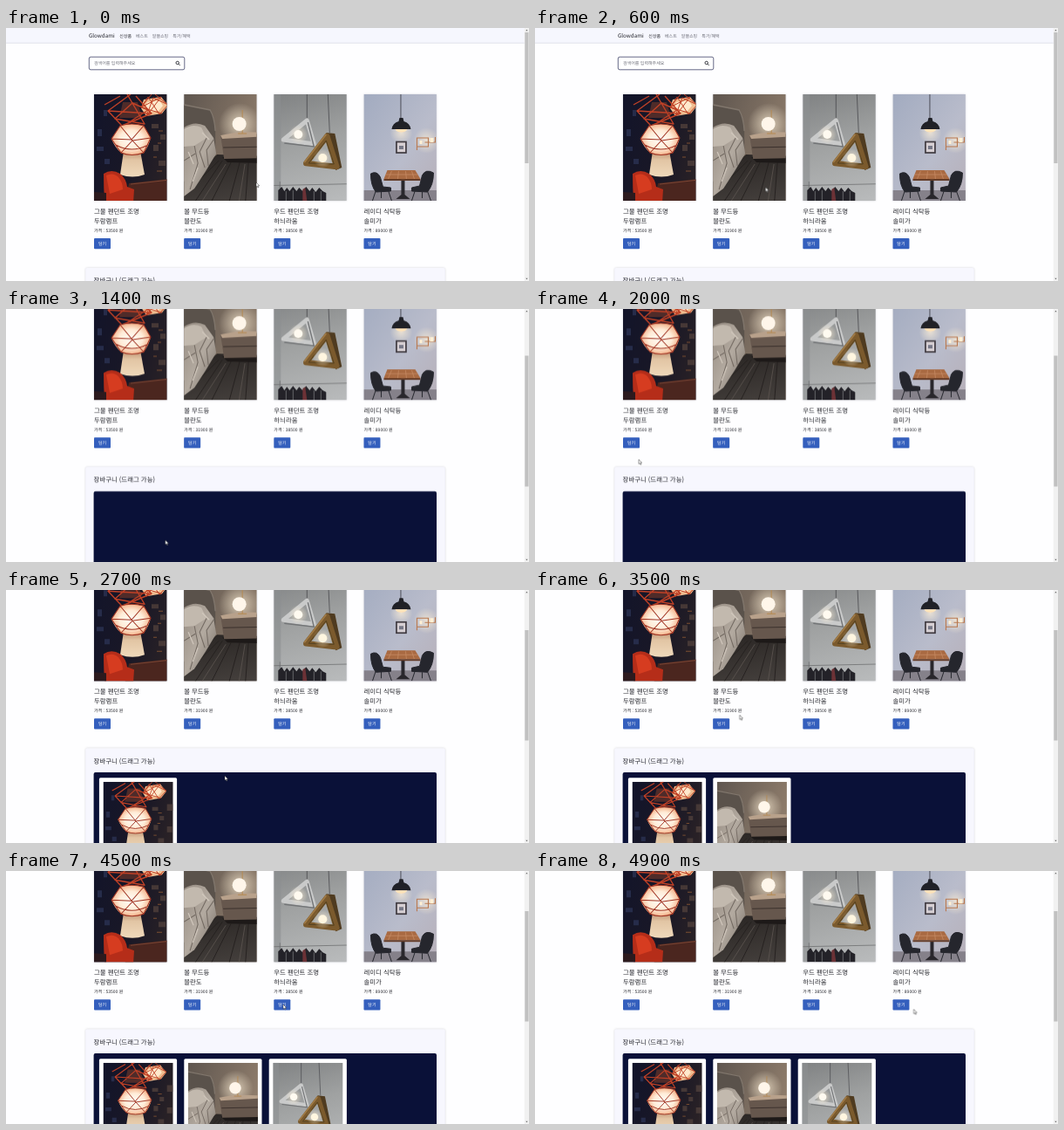
Write an HTML page that moves like this. It is 600x290 px and loops after 5 s.

```html
<!DOCTYPE html>
<html lang="ko">
<head>
<meta charset="utf-8">
<title>조명 쇼핑몰</title>
<style>
html, body { margin: 0; width: 100%; height: 100%; overflow: hidden; background: #fefeff; }
#stage { display: block; width: 600px; height: 290px; }
text { font-family: "Noto Sans CJK KR", "Noto Sans CJK", "Noto Sans KR", sans-serif; fill: #24252b; text-rendering: geometricPrecision; }
.h { font-size: 7.4px; }
.s { font-size: 5px; }
.logo { font-size: 6.25px; font-weight: 500; }
.dim { fill: #6d6e78; }
.btn { fill: #fff; text-anchor: middle; font-weight: 500; }
.soft { filter: drop-shadow(0 .4px .9px rgba(30, 30, 60, .2)); }

#page, #thumb, #cursor, .item { animation: 5s infinite step-end; }
#page { animation-name: scroll; }
#thumb { animation-name: thumb; }
#cursor { animation-name: cursor; }
#item0 { animation-name: add0; }
#item1 { animation-name: add1; }
#item2 { animation-name: add2; }

/* three turns of the wheel */
@keyframes scroll {
  0%, 14% { transform: translateY(0); }
  16% { transform: translateY(-14px); }
  18% { transform: translateY(-31.25px); }
  20% { transform: translateY(-50px); }
  22% { transform: translateY(-62.5px); }
  26% { transform: translateY(-80px); }
  28%, 100% { transform: translateY(-93.75px); }
}
@keyframes thumb {
  0%, 14% { y: 5px; height: 150px; }
  16% { y: 12px; height: 150px; }
  18% { y: 21px; height: 150px; }
  20% { y: 31px; height: 150px; }
  22% { y: 37.4px; height: 150px; }
  26% { y: 46.5px; height: 150px; }
  28% { y: 53.5px; height: 150px; }
  44%, 100% { y: 46px; height: 126.5px; }
}
@keyframes add0 { 0% { visibility: hidden; } 44%, 100% { visibility: visible; } }
@keyframes add1 { 0% { visibility: hidden; } 66%, 100% { visibility: visible; } }
@keyframes add2 { 0% { visibility: hidden; } 90%, 100% { visibility: visible; } }
/* the pointer moves ten times a second */
@keyframes cursor {
  0% { transform: translate(287px, 177px); animation-timing-function: steps(6); }
  12% { transform: translate(264.5px, 182.5px); animation-timing-function: steps(5); }
  22% { transform: translate(185px, 228.5px); animation-timing-function: steps(4); }
  30% { transform: translate(182px, 277px); animation-timing-function: steps(5); }
  40% { transform: translate(119px, 172.5px); animation-timing-function: steps(2); }
  44% { transform: translate(112px, 154px); }
  46% { transform: translate(112px, 154px); animation-timing-function: steps(4); }
  54% { transform: translate(251px, 213px); animation-timing-function: steps(5); }
  64% { transform: translate(214px, 154px); }
  68% { transform: translate(214px, 154px); animation-timing-function: steps(7); }
  82% { transform: translate(359.5px, 79px); animation-timing-function: steps(3); }
  88% { transform: translate(318px, 153px); }
  90% { transform: translate(318px, 153px); animation-timing-function: steps(4); }
  98%, 100% { transform: translate(434.5px, 158.5px); }
}
</style>
</head>
<body>
<svg id="stage" viewBox="0 0 600 290">
  <defs>
    <linearGradient id="night" x2="1" y2=".4">
      <stop offset="0" stop-color="#12142a"/><stop offset=".6" stop-color="#1a1826"/><stop offset="1" stop-color="#2a2226"/>
    </linearGradient>
    <radialGradient id="glow">
      <stop offset="0" stop-color="#fffdf8"/><stop offset=".6" stop-color="#ffecd8"/><stop offset="1" stop-color="#f3b48c"/>
    </radialGradient>
    <radialGradient id="halo">
      <stop offset="0" stop-color="#fff1d8" stop-opacity=".7"/><stop offset="1" stop-color="#fff1d8" stop-opacity="0"/>
    </radialGradient>
    <linearGradient id="shade" x2="0" y2="1">
      <stop offset="0" stop-color="#b98c6c"/><stop offset=".35" stop-color="#e2c5a4"/><stop offset="1" stop-color="#efd9bb"/>
    </linearGradient>
    <linearGradient id="room" x2="1" y2=".5">
      <stop offset="0" stop-color="#5f564f"/><stop offset="1" stop-color="#94816f"/>
    </linearGradient>
    <linearGradient id="floor" x2=".3" y2="1">
      <stop offset="0" stop-color="#282422"/><stop offset="1" stop-color="#484340"/>
    </linearGradient>
    <linearGradient id="linen" x2="1" y2="1">
      <stop offset="0" stop-color="#968c82"/><stop offset=".5" stop-color="#b3aaa0"/><stop offset="1" stop-color="#726a63"/>
    </linearGradient>
    <linearGradient id="plaster" x2=".2" y2="1">
      <stop offset="0" stop-color="#808283"/><stop offset=".45" stop-color="#9fa1a1"/><stop offset="1" stop-color="#b9bbbc"/>
    </linearGradient>
    <linearGradient id="wall" x2="1" y2="1">
      <stop offset="0" stop-color="#a2abc0"/><stop offset=".5" stop-color="#b9bccb"/><stop offset="1" stop-color="#b6abb2"/>
    </linearGradient>

    <g id="photo0">
      <rect width="96" height="140" fill="url(#night)"/>
      <path d="M66 34h8v5h-8zM76 46h6v6h-6zM68 58h6v7h-6zM74 76h8v6h-8zM86 30h8v9h-8zM86 60h7v8h-7z" fill="#463836"/>
      <path d="M4 40h5v8H4zM3 60h8v5H3zM11 18h4v7h-4zM12 74h6v6h-6z" fill="#262c4a"/>
      <path d="M74 42h5M73 56h4M68 72h4M72 88h6" stroke="#7c4f31" stroke-width="1.1"/>
      <path d="M57 6l20-3 8 10-7 9-18 3-6-9z" fill="#f0bd90"/>
      <path d="M61 9l14-2 4 6-5 6-11 1-4-5z" fill="#ffe9cc"/>
      <path d="M33 9h17l5 18H29z" fill="#4f2b29"/>
      <g fill="none" stroke="#bf4026" stroke-linejoin="round">
        <path d="M42 0L16 19 32 36 66 22 48 2M38 0L58 34 24 28 44 10 62 18 34 36M30 2L12 12M16 19L66 22" stroke-width="1.4"/>
        <path d="M54 15L62 3 75 23 85 12 68 4 60 25 77 3 54 15 78 22M66 0L54 15M70 0L85 12" stroke-width="1"/>
      </g>
      <path d="M34 65h19l5 27q-14 5-28 0z" fill="url(#shade)"/>
      <path d="M30 36q13-4 27 0l8 14q-2 9-8 17-13 5-26 0-7-6-11-16z" fill="url(#glow)"/>
      <path d="M20 51L30 36 44 53 65 50 57 36 43 52 20 51 31 67 44 53 57 67 65 50M31 67Q43 72 57 67M30 36Q43 32 57 36M25 58Q43 68 62 58" fill="none" stroke="#a13524" stroke-width="1.1" stroke-linejoin="round"/>
      <path d="M40 102l56-6v44H32z" fill="#4b261f"/>
      <path d="M42 103l54-6" stroke="#7a4534" stroke-width="1"/>
      <path d="M11 91q9-6 19 0 7 6 8 15l8 3-2 31H14q-3-20-3-49z" fill="#b52d19"/>
      <path d="M14 93q8-4 14 2 5 6 5 14l-15 5z" fill="#d63c20"/>
      <path d="M0 112l14 1v27H0z" fill="#2c1a1e"/>
    </g>

    <g id="photo1">
      <rect width="96" height="140" fill="url(#room)"/>
      <path d="M0 100l38-31 58 2v69H0z" fill="url(#floor)"/>
      <path d="M8 130L44 76M28 130L54 78M50 130L64 78M70 130L74 78M90 130L84 78M4 112L40 76" stroke="#24201f" stroke-width=".9"/>
      <path d="M16 130L48 80M62 130L70 80" stroke="#5d5651" stroke-width=".8"/>
      <path d="M0 12l30 6q5 8 6 24v20H0z" fill="#5a524b"/>
      <path d="M0 12l30 6q5 8 6 24" fill="none" stroke="#80766c" stroke-width="1.4"/>
      <path d="M0 38q12-8 24-2l10 14 3 18-12 20-13 20-12 9z" fill="url(#linen)"/>
      <path d="M0 40q10-7 20-2l6 12-14 9-12 1z" fill="#c2b9ae"/>
      <path d="M26 50l-8 16 6 18M12 59l4 20-9 30M34 52l-8 12 2 18M0 76l13-8" fill="none" stroke="#756c64" stroke-width="1.1"/>
      <path d="M5 66l6 14M21 44l8 8M16 84l-6 16" stroke="#d0c7bc" stroke-width="1.2"/>
      <circle cx="64" cy="34" r="24" fill="url(#halo)"/>
      <path d="M44 72l52 1v6l-46-1z" fill="#1d1918"/>
      <path d="M42 47l54-2v28l-50 1z" fill="#66574d"/>
      <path d="M42 47l22-4 32 1v4L44 51z" fill="#b8a18b"/>
      <path d="M45 61l51-1" stroke="#3a302c" stroke-width="1.1"/>
      <path d="M67 18v27M62 45h10" stroke="#b48a52" stroke-width="1"/>
      <circle cx="63.5" cy="34" r="8" fill="#fff6ea"/>
    </g>

    <g id="photo2">
      <rect width="96" height="140" fill="url(#plaster)"/>
      <path d="M0 0h8v140H0z" fill="#8d8f91" opacity=".6"/>
      <path d="M38 0v29M62 0l2 44" stroke="#3e3e42" stroke-width=".7"/>
      <path d="M11 52L38 30l8 27z" fill="none" stroke="#c9caca" stroke-width="5" stroke-linejoin="round"/>
      <path d="M12 56L46 60 39 32" fill="none" stroke="#737577" stroke-width="1.4"/>
      <circle cx="28" cy="46" r="11" fill="url(#halo)"/>
      <circle cx="28" cy="46" r="5" fill="#fffaf0"/>
      <path d="M60 44l10 1 8 39-7 3z" fill="#4f3b20"/>
      <path d="M37 79L61 48l11 35z" fill="none" stroke="#7b5a2d" stroke-width="6.5" stroke-linejoin="round"/>
      <path d="M35 78L60 46" stroke="#a27c47" stroke-width="1.6"/>
      <path d="M40 79L60 53l9 27z" fill="none" stroke="#53401f" stroke-width="1"/>
      <circle cx="56" cy="73" r="11" fill="url(#halo)"/>
      <circle cx="56" cy="73" r="5" fill="#fff6e0"/>
      <path d="M0 104.5l96-2M7 100v8" stroke="#6f7072" stroke-width=".8"/>
      <path d="M5 122V110l4-4 3 5 3-4 3 4 4-5 4 5 3-4 4 4 4-5 4 5 3-4 4 5 4-5 4 4 4 2v10z" fill="#232228"/>
      <path d="M33 109l3-2 2 15h-5z" fill="#6c3236"/>
      <path d="M14 111v11M22 110v12M46 111v11M54 111v11" stroke="#77787c" stroke-width=".8"/>
    </g>

    <g id="photo3">
      <rect width="96" height="140" fill="url(#wall)"/>
      <path d="M0 110h96v30H0z" fill="#85818a"/>
      <path d="M42.5 0v28" stroke="#33333b" stroke-width=".8"/>
      <circle cx="43" cy="44" r="13" fill="url(#halo)"/>
      <path d="M41 27h4l1 4q7 2 8 9H32q1-7 8-9z" fill="#202127"/>
      <path d="M36 40h14q-2 3.5-7 3.5T36 40z" fill="#ffe2b8"/>
      <rect x="37.5" y="54.5" width="11" height="12.5" fill="#d6cfd3" stroke="#3f3a40" stroke-width="1.7"/>
      <path d="M40.5 63v-4h5v4z" fill="#767887"/>
      <circle cx="72" cy="53" r="15" fill="url(#halo)"/>
      <path d="M61 50h13v10H61zM70 55h12v-6M61 60v4" fill="none" stroke="#b9784f" stroke-width="1.1"/>
      <path d="M64 53h3v4h-3zM76 50h4v5h-4z" fill="#fff0d4"/>
      <path d="M43 98h4v17l6 5H37l6-5z" fill="#29272c"/>
      <path d="M27 87h32l6 10H23z" fill="#a96a42"/>
      <path d="M25 92h37M32 88l-4 9M40 88l-1 9M48 88l1 9M55 88l3 9" stroke="#c98f67" stroke-width=".7"/>
      <path d="M23 97h42v2H23z" fill="#643c28"/>
      <g fill="#25262d" stroke="#25262d">
        <path d="M8 91q7-4 11 4l3 11 9 1v4l-17 1q-6-7-6-21z"/>
        <path d="M80 90q-9-5-13 3l-3 12-9 2v4l18 1q7-8 7-22z"/>
        <path d="M14 110l-4 12M28 110l4 12M20 111v8M59 110l-4 12M73 111l4 11M67 112v7" fill="none" stroke-width="1"/>
      </g>
    </g>
  </defs>

  <rect width="600" height="290" fill="#fefeff"/>
  <g id="page">
    <rect width="595" height="17" fill="#f6f7fe"/>
    <path d="M0 17.2h595" stroke="#d5d6e2" stroke-width=".7"/>
    <text class="logo" x="95" y="11">Glowdami</text>
    <text class="s" x="130.3" y="10.8">신상품</text>
    <text class="s dim" x="149" y="10.8">베스트</text>
    <text class="s dim" x="167.8" y="10.8">알뜰쇼핑</text>
    <text class="s dim" x="191.3" y="10.8">특가/혜택</text>

    <rect x="95.3" y="33.2" width="109.5" height="14.6" rx="1.8" fill="#fff" stroke="#55587a" stroke-width=".9"/>
    <text class="s dim" x="101" y="42.4">검색어를 입력해주세요</text>
    <g fill="none" stroke="#25262e" stroke-width=".9"><circle cx="196.7" cy="39.9" r="1.7"/><path d="M198 41.2l1.7 1.7"/></g>

    <g id="goods"></g>

    <rect class="soft" x="91.2" y="275" width="412.6" height="300" rx="2" fill="#f7f7fe"/>
    <text class="h" x="100.6" y="292.3">장바구니 (드래그 가능)</text>
    <rect x="100.6" y="302.8" width="393.4" height="240" rx="2" fill="#0a1138"/>
    <g id="cart"></g>
  </g>

  <rect x="594.7" width="5.3" height="290" fill="#f1f1f1"/>
  <path d="M596.2 3.2l1.2-1.4 1.2 1.4zM596.2 286.8l1.2 1.4 1.2-1.4z" fill="#606060"/>
  <rect id="thumb" x="595.3" y="5" width="4.2" height="150" fill="#c1c1c1"/>

  <path id="cursor" d="M0 0V5.2L1.2 4.1 2 6 2.9 5.6 2.1 3.8H3.7z" fill="#fff" stroke="#222" stroke-width=".45" stroke-linejoin="round"/>
</svg>
<script>
const products = [
  ["그물 펜던트 조명", "두람램프", 53500],
  ["볼 무드등", "블란도", 31900],
  ["우드 펜던트 조명", "하늬라움", 38500],
  ["레이디 식탁등", "솔미가", 89000]
];

// shows the top left part of a picture, `span` units wide
const photo = (i, x, y, w, span) => {
  const ratio = 122 / 83.4;
  return `<svg x="${x}" y="${y}" width="${w}" height="${w * ratio}" viewBox="0 0 ${span} ${span * ratio}">
    <use href="#photo${i}"/></svg>`;
};

const product = ([name, maker, price], i) => {
  const x = 101 + i * 103.15;
  return `<g class="soft">${photo(i, x, 76, 83.4, 83.4)}</g>
    <text class="h" x="${x}" y="212.8">${name}</text>
    <text class="h" x="${x}" y="224.2">${maker}</text>
    <text class="s" x="${x}" y="234.2">가격 : ${price} 원</text>
    <rect x="${x}" y="241" width="19" height="12.3" rx="1" fill="#345fbd"/>
    <text class="s btn" x="${x + 9.5}" y="249.1">담기</text>`;
};

const item = i => {
  const x = 106.9 + i * 97.4;
  return `<g class="item" id="item${i}">
    <rect x="${x}" y="308.9" width="89.2" height="150" rx="1.5" fill="#fff"/>
    ${photo(i, x + 4.6, 313.6, 80, 94)}</g>`;
};

document.getElementById("goods").innerHTML = products.map(product).join("");
document.getElementById("cart").innerHTML = [0, 1, 2].map(item).join("");
</script>
</body>
</html>
```
